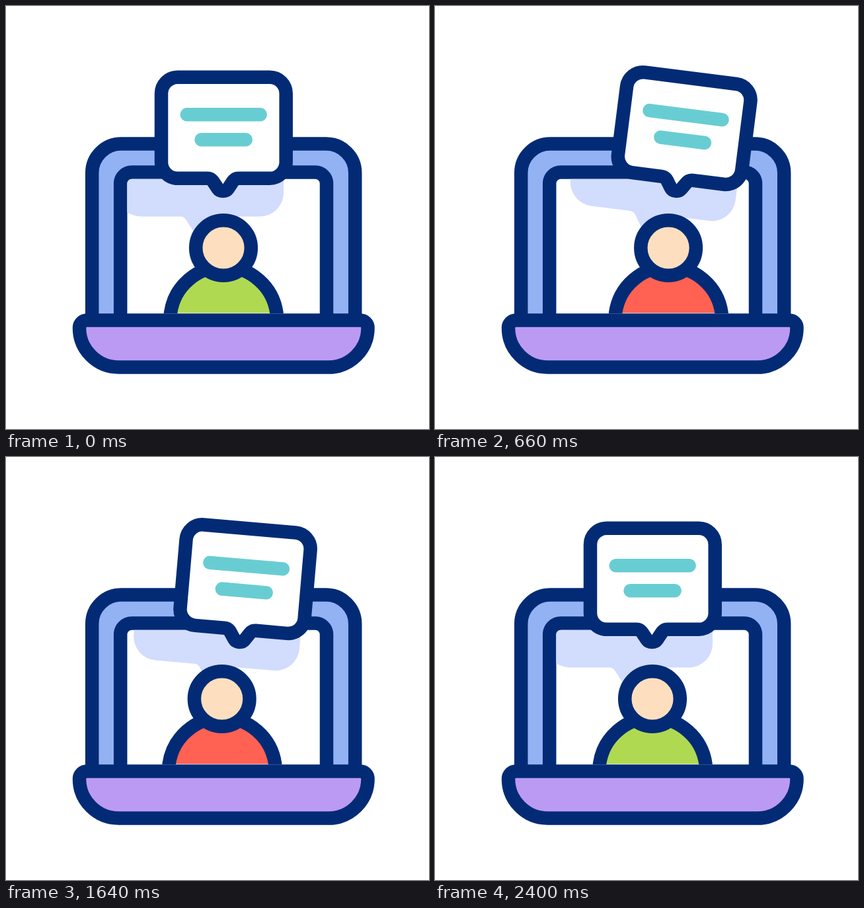
These frames come from a looping animation (640x640 px, 2420 ms). An HTML page:

```html
<!DOCTYPE html>
<html lang="en">
<head>
<meta charset="utf-8">
<title>Video call</title>
<style>
  html, body { margin: 0; height: 100%; overflow: hidden; background: #fff; }
  svg { display: block; width: 100vw; height: 100vh; }
  .line { stroke: #032b75; stroke-width: 20.5; stroke-linecap: round; stroke-linejoin: round; }
  .text { stroke: #68cdd2; stroke-width: 20.5; stroke-linecap: round; }
</style>
</head>
<body>
<svg viewBox="0 0 640 640">
  <defs>
    <clipPath id="screen"><rect x="183.3" y="261.7" width="291.5" height="203.6" rx="7"/></clipPath>
    <g id="person" class="line">
      <path d="M249 464.5A81 81 0 0 1 409.5 464.5"/>
      <circle cx="329" cy="366" r="41.8" fill="#fddfbf"/>
    </g>
  </defs>

  <path class="line" fill="#93b2f4" d="M130.2 475.5V252.5a44 44 0 0 1 44-44H484.2a44 44 0 0 1 44 44V475.5"/>
  <path class="line" fill="#fff" d="M173.2 475.5V268.5a17 17 0 0 1 17-17H468a17 17 0 0 1 17 17V475.5"/>

  <g clip-path="url(#screen)">
    <path id="shadow" fill="#d2dcfd" d="M168.5 150H420V282.5a36 36 0 0 1-36 36H322
      c-4 0-6.500 2-8.500 5L303 340c-4 6-16 6-20 0L272.500 323.500c-2-3-4.500-5-8.500-5H204.500a36 36 0 0 1-36-36Z"/>
    <use id="green" href="#person" fill="#b0d952"/>
    <use id="red" href="#person" fill="#ff6152"/>
  </g>

  <path class="line" fill="#bb9af3" d="M122.5 475.5H536a11.5 11.5 0 0 1 11.5 11.5a59.5 59.5 0 0 1-59.5 59.5H170.5
    a59.5 59.5 0 0 1-59.5-59.5a11.5 11.5 0 0 1 11.5-11.5Z"/>

  <g id="bubble">
    <path class="line" fill="#fff" d="M259.5 107.8H399.2a24.5 24.5 0 0 1 24.5 24.5V236.3a24.5 24.5 0 0 1-24.5 24.5H352
      c-4 0-7 2-9 5l-7 10.5c-3.5 5-12 5-15.5 0l-7-10.5c-2-3-5-5-9-5H259.5a24.5 24.5 0 0 1-24.5-24.5V132.3a24.5 24.5 0 0 1 24.5-24.5Z"/>
    <path class="text" d="M273.7 164.2H384.7M295.5 202.2H362.7"/>
  </g>
</svg>
<script>
  const LOOP = 2420;
  const SWING = 600;
  const SLIDE = 800;
  const shifts = [0, 38, -40, 38, 0];
  const angles = [0, 7.7, -8.2, 7.7, 0];

  const place = (id, transform) => document.getElementById(id).setAttribute("transform", transform);
  const clamp = x => Math.min(1, Math.max(0, x));
  const ease = x => x * x * (3 - 2 * x);
  const mix = (a, b, k) => a + (b - a) * k;

  function draw(now) {
    const t = Math.min(now % LOOP, 2400);

    const i = Math.min(3, Math.floor(t / SWING));
    const k = ease(t / SWING - i);
    const shift = mix(shifts[i], shifts[i + 1], k);
    const angle = mix(angles[i], angles[i + 1], k);
    const swing = `translate(${shift}) rotate(${angle} 329.3 280)`;
    place("bubble", swing);
    place("shadow", swing);

    // Green leaves and red arrives, then they trade back.
    const first = ease(clamp(t / SLIDE));
    const second = ease(clamp((t - 2 * SLIDE) / SLIDE));
    const green = t < 1.5 * SLIDE ? -301 * first : 307 * (1 - second);
    const red = 301 * (1 - first) - 307 * second;
    place("green", `translate(${green})`);
    place("red", `translate(${red})`);

    requestAnimationFrame(() => draw(performance.now()));
  }
  draw(0);
</script>
</body>
</html>
```
